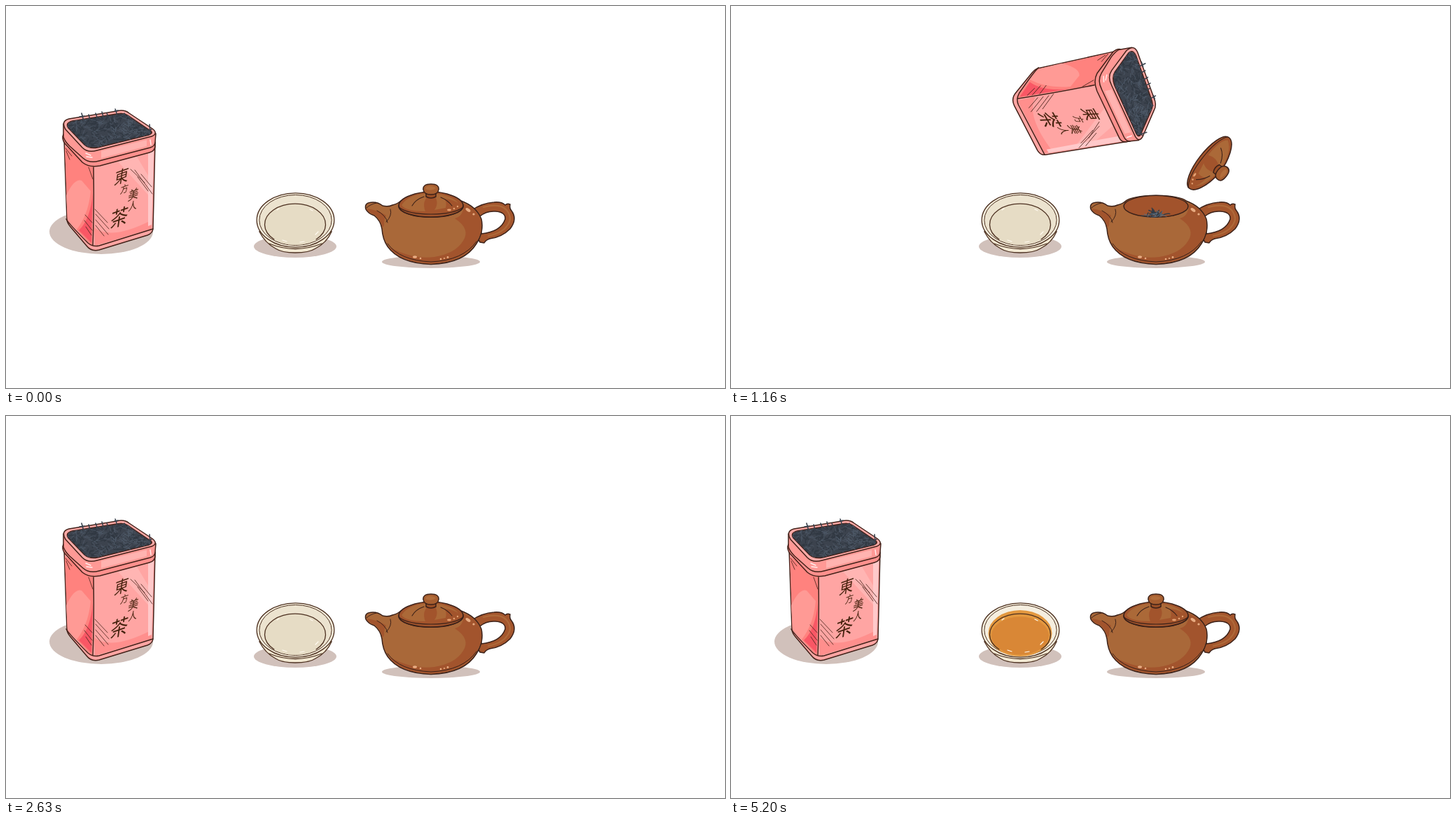
Animation of 1027x545 px, one loop 6700 ms. Source, as an HTML page:

```html
<!DOCTYPE html>
<html lang="zh-Hant">
<head>
<meta charset="utf-8">
<title>Tea</title>
<style>
html, body { margin: 0; width: 100%; height: 100%; overflow: hidden; background: #fff; }
svg { display: block; width: 100vw; height: 100vh; }
.ln { fill: none; stroke-linecap: round; }
.tin { stroke: #43221a; stroke-width: 1.5; stroke-linejoin: round; }
.pot { stroke: #3b2119; stroke-width: 1.5; stroke-linejoin: round; }
.cup { stroke: #4c3020; stroke-width: 1.3; }
.ket { stroke: #35272d; stroke-width: 2; stroke-linejoin: round; }
.shadow { fill: #d1c1bb; }
text { font-family: "Noto Sans CJK TC", "Noto Sans CJK", sans-serif; font-weight: 500; fill: #46230f; text-anchor: middle; }
</style>
</head>
<body>
<svg viewBox="0 0 1027 545">
  <defs>
    <clipPath id="tinMouth"><path d="M95 164L158 154Q168 152 174 156L205 177Q212 181 204 184L131 202Q119 204 112 198L89 174Q84 167 95 164Z"/></clipPath>
    <clipPath id="potMouth"><path d="M561 286V265H653V286A46 15.5 0 0 1 561 286Z"/></clipPath>
  </defs>

  <ellipse id="tinShadow" class="shadow" cx="136" cy="322" rx="74" ry="32"/>
  <ellipse class="shadow" cx="413" cy="343" rx="59" ry="16"/>
  <ellipse id="potShadow" class="shadow" cx="607" cy="365" rx="70" ry="9"/>

  <g id="cup">
    <path class="cup" fill="#f2e8d2" d="M362 322Q370 338 385 346Q394 352 413 352Q433 352 442 346Q458 338 465 322Z"/>
    <path class="cup ln" d="M376 339Q413 354 451 339"/>
    <ellipse class="cup" cx="413.5" cy="305.5" rx="55.3" ry="38.7" fill="#f7efdd"/>
    <ellipse class="cup" cx="413.5" cy="305.5" rx="51.7" ry="36" fill="#ece3cf" id="wall" style="stroke-width:1"/>
    <ellipse cx="413" cy="311.5" rx="43.5" ry="29.5" fill="#e6dcc5"/>
    <ellipse id="tea" fill="#e3983f"/>
    <ellipse id="teaDeep" cx="413" cy="313.5" rx="41" ry="27" fill="#d98736"/>
    <path class="cup ln" d="M383 333A43.5 29.5 0 1 1 443 333"/>
    <path class="ln" stroke="#fffaf0" stroke-width="1.2" d="M387 291l3-2M434 290l4 2M395 334l6 2M420 337l6-1M442 326l4-4"/>
  </g>

  <g id="kettle">
    <path class="ket" fill="#bccbd9" d="M757 46Q768 18 794 9Q823 3 836 24Q852 55 858 128L844 126Q842 74 824 41Q805 13 785 29Q775 37 768 50Z"/>
    <path fill="#3b3c44" d="M775 20Q790 8 806 8Q829 9 839 35Q851 72 856 126L849 124Q845 68 827 33Q805 8 784 24Q776 30 770 29Z"/>
    <path class="ln" stroke="#e9f2fb" stroke-width="3" d="M762 45Q770 29 781 22"/>
    <path class="ket" fill="#bdccda" d="M858 128L868 127Q876 140 883 150L878 158L858 142Z"/>
    <path class="ket" fill="#c3d0dc" d="M676 98Q662 115 639 131Q641 135 651 135Q670 134 689 158L716 187Z"/>
    <path fill="#eef4fa" d="M674 105Q661 120 647 131Q660 130 673 135Q678 125 674 105Z"/>
    <path class="ket" fill="#d7e3e3" d="M674 97L742 41Q803 50 830 84Q854 111 872 147Q830 218 757 241Q699 167 674 97Z"/>
    <path fill="#b7c7cb" d="M677 97L691 89Q715 168 779 231L758 239Q700 169 677 97Z"/>
    <path fill="#b7c7cb" d="M742 42Q803 51 830 85Q854 111 870 147L856 169Q830 99 742 42Z"/>
    <path class="ket" fill="#d8e5f1" d="M673 98Q670 87 680 75Q701 48 721 37Q735 32 742 41Q716 72 674 98Z"/>
    <path fill="#f1f6fb" d="M680 80Q700 51 722 40L729 40Q708 66 677 87Z"/>
    <path class="ket ln" style="stroke-width:1.4" d="M672 89Q711 67 734 36M674 94Q715 69 739 38"/>
    <path class="ket" fill="#cfdeeb" d="M757 241Q829 218 872 147L885 163Q844 239 779 260Q771 256 757 241Z"/>
    <path fill="#f3f8fd" d="M794 228Q829 209 852 179L866 194Q839 227 806 246Z"/>
    <path fill="#aebfd0" d="M858 171L871 150L883 164L872 184Z"/>
  </g>

  <g id="pot">
    <path class="pot" fill="#a4562d" fill-rule="evenodd" d="M664 292Q680 281 697 280Q708 279 713 284Q716 281 720 283Q719 289 722 292Q731 304 720 318Q708 330 691 332Q685 334 683 338L677 337L670 325ZM677 300Q686 292 699 293Q714 294 713 304Q707 322 679 325Z"/>
    <path class="ln" stroke="#ae6a3a" stroke-width="2" d="M682 287Q712 279 719 298Q723 307 712 318Q704 325 689 328"/>
    <path class="pot" fill="#a96839" d="M514 290Q511 280 524 280Q532 280 538 285Q546 287 552 284Q560 282 564 278C575 268 640 268 650 278Q672 286 679 304Q683 322 672 339Q655 367 607 368.5Q562 367 545 343Q538 333 537 318Q535 306 526 299Q517 296 514 290Z"/>
    <path fill="#a2542d" d="M654 282Q672 288 678 304Q682 322 671 338Q654 366 607 367.5Q562 366 546 343Q580 362 612 358Q642 353 653 335Q664 318 641 303Q654 300 654 282Z"/>
    <path fill="#a2542d" d="M515 289Q532 291 543 299Q540 303 540 313L538 316Q535 305 527 298Q518 296 515 289Z"/>
    <path class="pot ln" style="stroke-width:1" d="M530 292Q543 299 545 309M549 290Q552 299 543 308M515 288Q520 283 529 281M545 339Q562 363 607 365Q653 363 672 336"/>
    <g fill="#e9ad83"><ellipse cx="584" cy="358" rx="3" ry="1.8"/><circle cx="592" cy="360" r="1.3"/><circle cx="621" cy="361" r="1.3"/><circle cx="626" cy="360" r="1.1"/><circle cx="631" cy="358.5" r="1.4"/><ellipse cx="660" cy="291" rx="4" ry="2" transform="rotate(35 660 291)"/><circle cx="668" cy="297" r="1.6"/></g>
    <ellipse class="pot" cx="607" cy="285.8" rx="46" ry="15.5" fill="#a2532c"/>
    <g clip-path="url(#potMouth)">
      <ellipse id="water" fill="#d4e7ea" opacity=".75"/>
      <g id="pile"><path class="ln strand" stroke="#333b45" stroke-width="1.5"/><path class="ln strand" stroke="#596a7a" stroke-width="1"/></g>
    </g>
    <g id="lid">
      <path class="pot" fill="#a2542c" d="M561 285C561 273 588 265 607 265S653 273 653 285C653 295 630 301 607 301S561 295 561 285Z"/>
      <path fill="#ab6938" d="M565 284Q575 268 606 267Q593 279 599 293Q571 293 565 284Z"/>
      <path fill="#ab6938" d="M610 267Q637 270 646 281Q636 275 626 275Q630 280 628 288L612 291Q620 280 610 267Z"/>
      <path class="pot ln" style="stroke-width:1.1" d="M561 287Q574 297 607 297T653 287M597 272Q585 276 580 285M621 273Q631 277 637 285"/>
      <g fill="#e5a273"><ellipse cx="633" cy="291" rx="3" ry="1.4"/><circle cx="640" cy="289" r="1.3"/><circle cx="645" cy="286" r="1.2"/></g>
      <path class="pot" fill="#994e25" d="M600 265L600 272Q607 276 614 272L614 265Z"/>
      <path class="pot" fill="#a65e30" d="M596 262Q595 254 607 254T618 262Q617 269 607 269T596 262Z"/>
      <path fill="#b26d3b" d="M599 261Q600 256 607 257T614 260Q607 265 599 261Z"/>
    </g>
  </g>

  <path id="waterJet" class="ln" stroke="#cfe4ec" stroke-width="6" d="M643 146Q611 176 606 292"/>
  <path id="teaJet" class="ln" stroke="#d98736" stroke-width="5" d="M448 259Q429 276 426 324"/>

  <g id="tin">
    <path class="tin" fill="#ffa5a3" d="M83 190L87 304Q87 309 92 315L115 342Q122 351 133 348L202 327Q210 324 210 317L213 194Z"/>
    <path fill="#ff827e" d="M84 200L88 305L123 343L125 228Z"/>
    <path fill="#ff9a95" d="M86 270Q98 245 108 249L121 264Q118 297 101 319L88 305Z"/>
    <path fill="#f95765" d="M124 266Q121 304 104 320L122 338Z"/>
    <path fill="#ff8f8d" d="M126 316Q150 335 207 306L208 318L127 342Z"/>
    <path fill="#ffc0bf" d="M160 222L187 215L209 252V276Z" opacity=".6"/>
    <path fill="#ffc9ca" d="M203 208L211 206L208 312L203 314Z"/>
    <path class="tin ln" d="M125 230Q126 290 124 342M86 304Q90 311 117 338Q124 344 133 342L210 318"/>
    <path class="tin ln" style="stroke-width:.8" d="M178 233L198 252M184 234L209 268M188 244L203 264M193 240L208 258M127 290L145 309M128 297L147 318M128 305L146 326M128 313L140 328M113 298L123 309M112 306L123 320M114 315L122 327M85 203L94 214M86 207L91 219M118 230L124 247"/>
    <path class="tin" fill="#ff908d" d="M82 183Q79 189 84 196L109 223Q119 231 134 228L205 209Q213 207 213 199L212 188L120 212Z"/>
    <path class="tin" fill="#ff9995" d="M82 168L82 187Q84 193 91 200L110 217Q119 225 133 221L206 202Q213 200 213 194L214 182Z"/>
    <path fill="#ffc8c7" d="M136 207L201 191V200L136 217Z" opacity=".55"/>
    <path class="tin" fill="#ffaaa7" d="M90 161L158 150Q169 147 176 153L209 175Q218 182 208 186L130 206Q117 210 109 202L85 176Q78 164 90 161Z"/>
    <path class="tin" fill="#3c434e" d="M95 164L158 154Q168 152 174 156L205 177Q212 181 204 184L131 202Q119 204 112 198L89 174Q84 167 95 164Z"/>
    <g clip-path="url(#tinMouth)"><path class="ln strand" stroke="#303842" stroke-width="1.4"/><path class="ln strand" stroke="#4e5a68" stroke-width=".9"/></g>
    <path class="ln" stroke="#39424d" stroke-width="1.6" d="M111 164L108 153M105 158L112 157M120 162L118 155M131 161L128 153M139 158L137 151M146 158L144 153M159 156L156 147M155 150L160 149M171 159L169 153M206 180L205 169M203 178L208 176"/>
    <path class="ln" stroke="#fff" stroke-width="1.5" opacity=".8" d="M114 210L121 213M115 215L123 216M206 191L207 198"/>
    <g id="label"></g>
  </g>
</svg>
<script>
const $ = id => document.getElementById(id);
const LOOP = 6700;
const ramp = (t, a, b) => Math.min(1, Math.max(0, (t - a) / (b - a)));
const mix = (a, b, k) => a + (b - a) * k;
const set = (el, attrs) => { for (const k in attrs) el.setAttribute(k, attrs[k]); };
const show = (id, on) => { $(id).style.display = on ? "" : "none"; };

// Move a part so that its pivot lands on (x, y), turned by deg.
const pose = (id, px, py, x, y, deg, s = 1) =>
  $(id).setAttribute("transform", `translate(${x} ${y}) rotate(${deg}) scale(${s}) translate(${-px} ${-py})`);

function random(seed) {
  return () => (seed = (seed * 16807) % 2147483647) / 2147483647;
}

function strands(n, x, y, rx, ry, seed) {
  const r = random(seed);
  let d = "";
  for (let i = 0; i < n; i++) {
    const a = r() * Math.PI * 2, m = Math.sqrt(r()), len = 4 + r() * 6, dir = r() * Math.PI * 2;
    const dx = Math.cos(dir) * len, dy = Math.sin(dir) * len * .8;
    d += `M${(x + Math.cos(a) * m * rx).toFixed(1)} ${(y + Math.sin(a) * m * ry).toFixed(1)}`
      + `q${(dx / 2 + r() * 4 - 2).toFixed(1)} ${(dy / 2 + r() * 4 - 2).toFixed(1)} ${dx.toFixed(1)} ${dy.toFixed(1)}`;
  }
  return d;
}

document.querySelectorAll("#tin .strand").forEach((p, i) => p.setAttribute("d", strands(190, 148, 178, 64, 27, 71 + i * 900)));
document.querySelectorAll("#pile .strand").forEach((p, i) => p.setAttribute("d", strands(i ? 14 : 32, 605, 298, 13, 3.5, 37 + i * 500)));

const glyphs = [["東", 165, 243, 24], ["方", 169, 261, 14], ["美", 182, 269, 18], ["人", 181, 285, 15], ["茶", 162, 302, 30]];
$("label").innerHTML = glyphs.map(([c, x, y, size]) =>
  `<text transform="translate(${x} ${y}) matrix(.84 -.3 -.14 1 0 0)" y="${size * .37}" font-size="${size}">${c}</text>`).join("");

function draw(t) {
  const tinUp = t >= 740 && t < 1430;
  const shake = ramp(t, 870, 1160);
  if (tinUp) pose("tin", 147, 250, 503.5, 138, mix(75, 79.5, shake));
  else pose("tin", 147, 250, 147, 250, 0);
  show("tinShadow", !tinUp);

  const open = t >= 370 && t < 2460;
  if (open) pose("lid", 607, 285, 683, 224, 128);
  else pose("lid", 607, 285, 607, 285, 0);

  show("pile", open && t >= 870);
  pose("pile", 605, 302, 605, 302, 0, Math.max(.1, shake));

  show("kettle", t >= 1530 && t < 2630);
  if (t >= 1700) pose("kettle", 765, 135, 770, 133, -4);
  else pose("kettle", 765, 135, 765, 135, 0);
  show("waterJet", t >= 1700 && t < 2460);

  show("water", open && t >= 1830);
  const [cy, rx, ry] = t < 2030 ? [296, 24, 5] : t < 2230 ? [291, 38, 8] : [285, 45, 11];
  set($("water"), { cx: 607, cy, rx, ry });

  const back = ramp(t, 4900, 5200);
  const potHome = t < 4040 || t >= 5200;
  if (potHome) pose("pot", 607, 310, 607, 310, 0);
  else if (t < 4570) pose("pot", 607, 310, 592.5, 254, -15.2);
  else pose("pot", 607, 310, mix(535, 607, back), mix(216, 310, back), mix(-38, 0, back));
  show("potShadow", potHome);
  show("teaJet", t >= 4570 && t < 4900);

  const full = t >= 5200;
  show("tea", t >= 4570);
  show("teaDeep", full);
  set($("tea"), { cx: mix(415, 413, back), cy: mix(327, 310, back), rx: mix(24, 45.5, back), ry: mix(13, 33, back) });
  $("wall").setAttribute("fill", full ? "#f5eedf" : "#ece3cf");
}

function tick() {
  draw(performance.now() % LOOP);
  requestAnimationFrame(tick);
}
tick();
</script>
</body>
</html>
```
